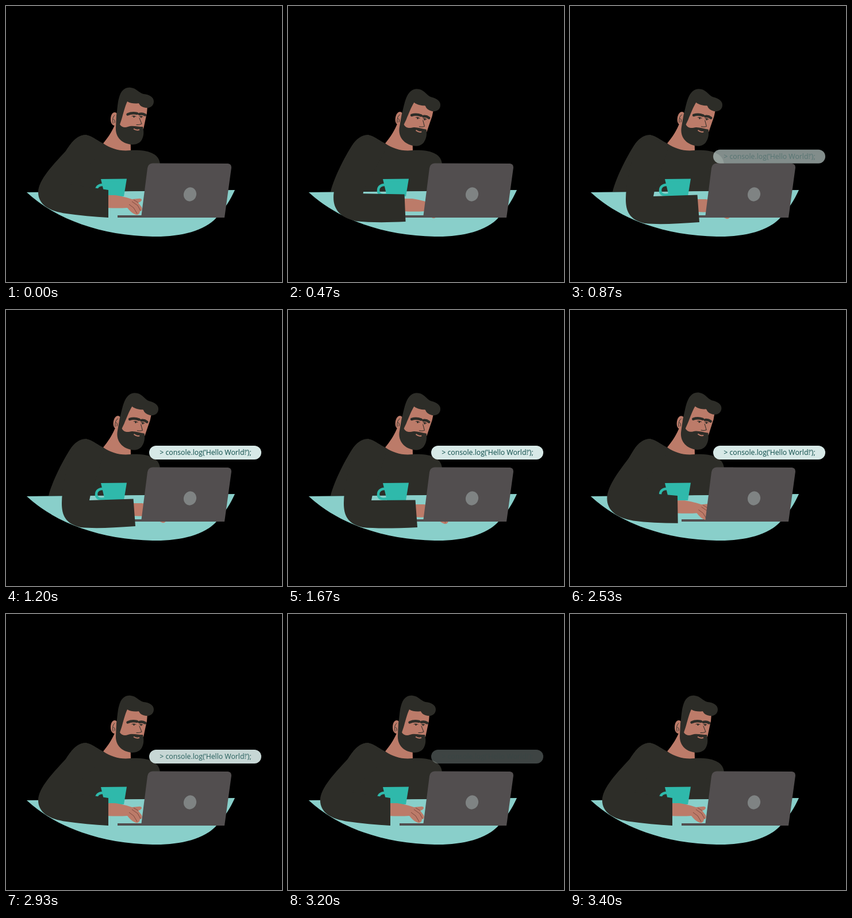
Recreate the animation shown at these times as an HTML page. Size 480x480 px, loop 3470 ms.

```html
<!DOCTYPE html>
<html lang="en">
<head>
<meta charset="utf-8">
<title>Coder at a laptop</title>
<style>
  html, body { margin: 0; width: 100%; height: 100%; overflow: hidden; background: #000; }
  svg { display: block; width: 100%; height: 100%; }
  .dark { fill: #2d2d28; }
  .skin { fill: #bc7b69; }
  .metal { fill: #524e4f; }
  .line { fill: none; stroke: #2d2d28; stroke-linecap: round; stroke-linejoin: round; }
  text { font: 12.25px "Open Sans", sans-serif; fill: #0a4a47; text-anchor: middle; }
</style>
</head>
<body>
<svg viewBox="0 0 480 480">
  <path fill="#89cfca" d="M36 324L398 320C390 338 380 353 366 368C345 392 300 402 255 401C166 399 88 372 36 324Z"/>

  <path class="skin" d="M191 202C186 216 178 228 169 239Q188 256 217 252L216 210Z"/>
  <path class="dark" d="M74 323C81 296 99 262 111 243C120 229 132 222 143 225C153 228 160 235 169 239C184 249 199 253 217 251C242 250 266 254 268 275L240 322Z"/>

  <g id="head">
    <path class="skin" d="M193 187C188 182 182 187 182 197C182 206 187 210 193 207Z"/>
    <path class="line" d="M186 204Q184 193 189 190M187 197Q190 198 189 203" stroke-width=".9"/>
    <path class="skin" d="M208 162L246 174L245 186L239 214L215 222L196 210L198 180Z"/>
    <path class="dark" d="M192 190C194 178 194 165 198 155C202 145 209 141 217 142C227 143 231 151 239 153C249 154 257 158 257 166C257 174 250 178 243 177C237 176 233 174 231 169C226 170 217 170 211 166C207 174 204 187 201 197L198 206C201 211 207 212 212 210C219 207 229 210 238 210C240 218 240 226 236 233C231 241 221 242 213 240C199 237 190 226 191 211Z"/>
    <g id="face">
      <path class="line" d="M211.5 188.500Q219 185 228 187M232 188Q237 186.500 242 189.500" stroke-width="4.500" stroke-linecap="butt"/>
      <path class="line" d="M219 191.500Q222 190 226 192M232 192Q235 190.500 238 192.500M232 195L236 205Q232 207 227 206.500" stroke-width="1"/>
      <circle class="dark" cx="222.500" cy="192.500" r="1.500"/>
      <circle class="dark" cx="235" cy="193" r="1.500"/>
      <path d="M222 213.500Q227 217 232 215" fill="none" stroke="#bc7b69" stroke-width="2"/>
    </g>
  </g>

  <path d="M168 311C160 311 157 316 157 321C157 327 162 330 172 328" fill="none" stroke="#2fb9ab" stroke-width="4.500"/>
  <path fill="#2fb9ab" d="M165 301L210 300.500L205 331H172Z"/>
  <path class="metal" d="M194 364H242V368H194Z"/>

  <g id="hand">
    <path class="skin" d="M174 329H190C202 331 211 333 219 336L230 335Q236 334 236 338Q234 341 230 342L236 350Q238 356 233 357Q232 364 226 363C220 361 215 356 211 351Q196 352 174 351Z"/>
    <path d="M219 340L229 347L234 356M214 345L222 351L228 361M222 337L230 342" fill="none" stroke="#7d4a40" stroke-width="1"/>
  </g>
  <path id="arm" class="dark"/>

  <path class="metal" d="M235 368L246 282Q247 274 255 273.500L386 274Q392 274.500 392 281L380 368Z"/>
  <ellipse cx="320" cy="327.500" rx="11" ry="12.200" fill="#7f8383" transform="rotate(15 320 327.500)"/>

  <g id="bubble">
    <rect id="pill" x="249" y="236" width="195" height="24" rx="12" fill="#d7e9e7"/>
    <text id="code" x="347" y="252">&gt; console.log(’Hello World!’);</text>
  </g>
</svg>
<script>
  const LOOP = 3470, STEP = 200 / 3;
  const $ = id => document.getElementById(id);
  const [head, face, hand, arm, bubble, pill, code] =
    ["head", "face", "hand", "arm", "bubble", "pill", "code"].map($);

  // 0 before start, 1 after end, smooth between
  const ease = (t, start, end) => {
    const x = Math.min(1, Math.max(0, (t - start) / (end - start)));
    return x * x * (3 - 2 * x);
  };
  const mix = (a, b, p) => a + (b - a) * p;
  const move = (part, x, y) => part.setAttribute("transform", `translate(${x} ${y})`);

  // Outline of the arm between rest (0) and full reach (1), across and down
  function armPath(across, down, bob) {
    const at = (x0, y0, x1, y1) => `${mix(x0, x1, across)} ${mix(y0, y1, down)} `;
    const cuff = (x0, y0, x1, y1) => at(x0, y0, x1, y1 + bob);
    return "M140 224C" + at(122, 224, 122, 227) + at(112, 240, 115, 244) + at(104, 252, 110, 257) +
      "C" + at(84, 274, 104, 283) + at(56, 302, 97, 312) + at(56, 324, 97, 336) +
      "C" + at(56, 345, 97, 356) + at(75, 357, 103, 372) + at(105, 361, 130, 378) +
      "Q" + at(140, 366, 160, 381) + cuff(178, 368, 225, 376) +
      "L" + cuff(178, 320, 221.5, 328.5) + "L" + at(112, 310, 145, 331) +
      "L" + at(112, 308, 147, 321) + "L170 250Z";
  }

  function draw(t) {
    const reach = ease(t, 130, 750) - ease(t, 2250, 2650);
    const drop = Math.sin(reach * Math.PI / 2); // the arm swings along an arc
    const nod = ease(t, 130, 470) - ease(t, 2430, 2780);
    const bob = 1 - Math.cos((t - 870) / 320 * 2 * Math.PI);
    const enter = ease(t, 690, 1000);
    const shown = enter - ease(t, 2840, 3400);

    head.setAttribute("transform", `rotate(${7 * nod} 200 235)`);
    move(face, -2 * nod, 0);
    arm.setAttribute("d", armPath(reach, drop, bob));
    move(hand, 46 * reach, 7 * drop + bob * reach);
    move(bubble, 0, 35 * (1 - enter));
    pill.setAttribute("opacity", shown);
    code.setAttribute("opacity", shown * shown);
  }

  function frame() {
    const t = performance.now() % LOOP;
    draw(Math.floor((t + 4) / STEP) * STEP);
    requestAnimationFrame(frame);
  }
  frame();
</script>
</body>
</html>
```
